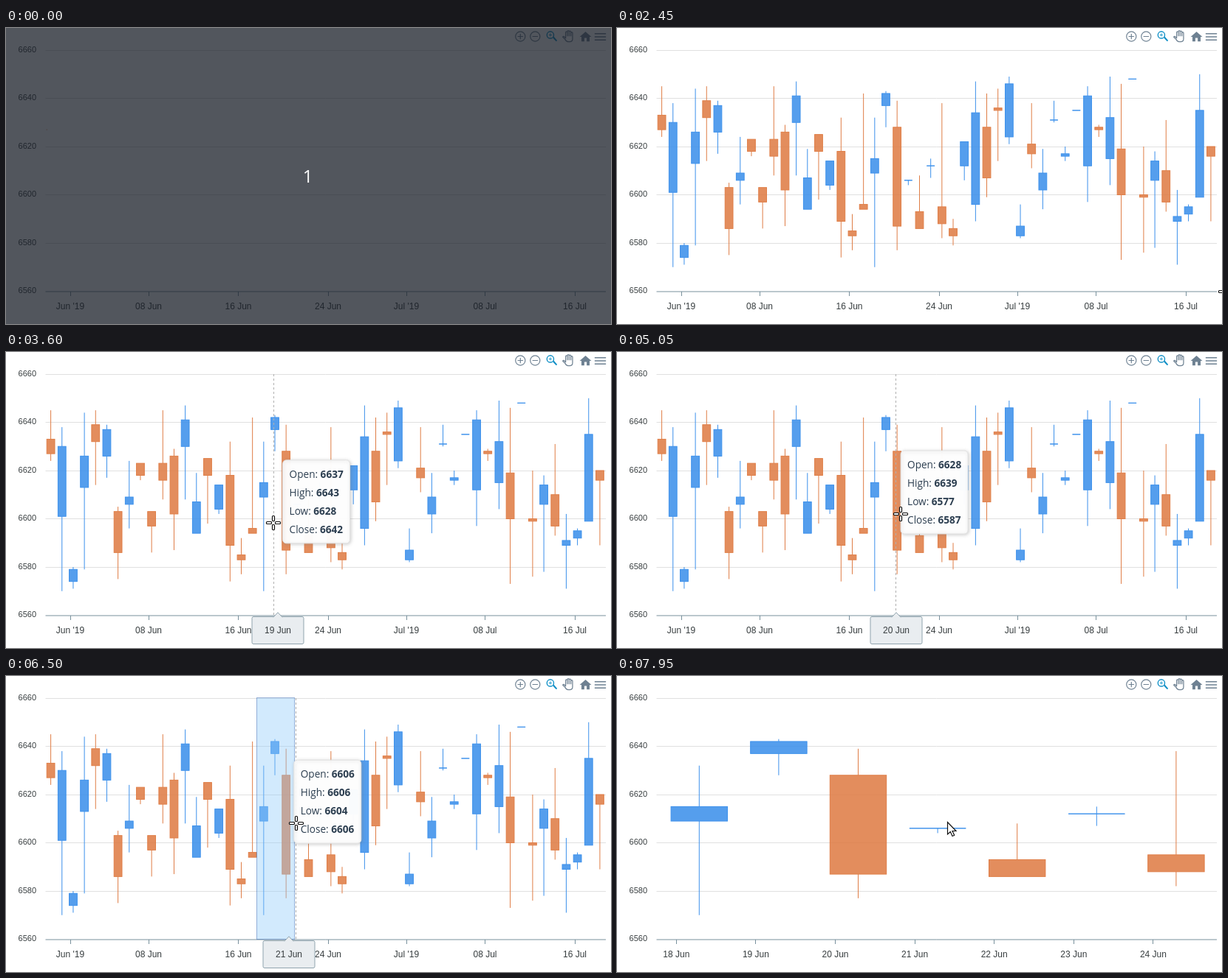
Animation, 819 px wide and 402 px high, one loop 8000 ms. Source, as an HTML page with a canvas:

```html
<!DOCTYPE html>
<html lang="en">
<head>
<meta charset="utf-8">
<title>Candlestick chart</title>
<style>
  html, body { margin: 0; width: 100%; height: 100%; overflow: hidden; background: #fff; }
  canvas { display: block; }
</style>
</head>
<body>
<canvas id="stage" width="819" height="402"></canvas>
<script>
const ctx = document.getElementById('stage').getContext('2d');
const LOOP = 8000, LEFT = 54, RIGHT = 812, TOP = 30, BOTTOM = 357.5;
const SHOW_TIP = 2470, DRAG = 6030, ZOOM = 7350, ARROW = 7940;
const UP = '60,144,235', DOWN = '223,125,70', SLATE = '#6e8192', INK = '#373d3f';
const LABEL_FONT = '12px "Liberation Sans", Arial, sans-serif';

// Prices are stored relative to 6500: [open, close] and [high, low].
const bodies = [
  [133,127],[101,130],[74,79],[113,126],[139,132],[126,137],[103,86],[106,109],[123,118],[103,97],
  [123,116],[126,102],[130,141],[94,107],[125,118],[104,114],[118,89],[85,83],[96,94],[109,115],
  [137,142],[128,87],[106,106],[93,86],[112,112],[95,88],[86,83],[112,122],[96,134],[128,107],
  [136,135],[124,146],[83,87],[121,117],[102,109],[131,131],[116,117],[135,135],[112,141],[128,127],
  [115,132],[119,100],[148,148],[100,99],[106,114],[110,97],[89,91],[92,95],[99,135],[120,116]];
const wicks = [
  [145,124],[138,70],[80,71],[144,79],[145,114],[139,117],[105,75],[124,96],[123,116],[103,86],
  [145,108],[129,87],[147,108],[119,94],[125,98],[114,102],[132,74],[92,77],[142,94],[132,70],
  [143,128],[139,77],[106,104],[108,86],[115,107],[138,82],[90,79],[122,106],[147,89],[142,99],
  [144,114],[149,121],[96,82],[138,111],[119,94],[139,130],[120,114],[135,135],[145,97],[129,124],
  [149,104],[146,73],[148,148],[120,76],[118,78],[131,93],[102,71],[96,89],[150,99],[120,89]];

// Pointer path: time, x, y
const path = [
  [2450,825,358],[2650,690,318],[2850,545,272],[3000,452,243],[3120,415,239],[3250,397,236],
  [3600,362,232],[3930,351,230],[4080,351,229],[4450,351,229],[4680,384,220],[5050,384,220],
  [5500,352,207],[5850,341,201],[6030,341,201],[6500,393,200],[6830,431,200],[7000,449,201]];

const wide = { x0: 60.6, step: 15.17, ticks: [
  [87,"Jun '19"],[193,'08 Jun'],[314.5,'16 Jun'],[436,'24 Jun'],[542,"Jul '19"],[648.5,'08 Jul'],[770,'16 Jul']] };
const close = { x0: 111.3 - 19 * 107.6, step: 107.6,
  ticks: Array.from({ length: 7 }, (_, k) => [80.3 + 107.6 * k, `${18 + k} Jun`]) };

const clamp = (v, lo, hi) => Math.min(hi, Math.max(lo, v));
const yOf = price => TOP + (160 - price) * 3.275;

function pointer(t) {
  const i = path.findIndex(p => p[0] > t);
  if (i < 1) return i ? path[path.length - 1].slice(1) : path[0].slice(1);
  const [a, b] = [path[i - 1], path[i]], f = (t - a[0]) / (b[0] - a[0]);
  return [1, 2].map(k => a[k] + (b[k] - a[k]) * f);
}

const nearest = x => clamp(Math.round((x - wide.x0) / wide.step), 0, 49);
const crossX = i => 59 + i * wide.step;

function tipTarget(t) {
  if (t < SHOW_TIP) return [52, 20, 88];
  const [x, y] = pointer(t), cx = crossX(nearest(x));
  return [cx > 432 ? cx - 94 : cx + 6.5, Math.min(y - 86, 244), cx];
}

// Tooltip and axis label trail their targets by a 150 ms transition.
function trailing(t) {
  const sum = [0, 0, 0], n = 16;
  for (let k = 0; k < n; k++) tipTarget(t - k * 10).forEach((v, j) => sum[j] += v / n);
  return sum;
}

function text(str, x, y, font, color = INK, align = 'center') {
  ctx.font = font; ctx.fillStyle = color; ctx.textAlign = align;
  ctx.fillText(str, x, y);
}

function line(x1, y1, x2, y2, color, dash = []) {
  ctx.strokeStyle = color; ctx.lineWidth = 1; ctx.setLineDash(dash);
  ctx.beginPath(); ctx.moveTo(x1, y1); ctx.lineTo(x2, y2); ctx.stroke();
  ctx.setLineDash([]);
}

function box(x, y, w, h, r, fill, stroke) {
  ctx.beginPath(); ctx.roundRect(x, y, w, h, r);
  ctx.fillStyle = fill; ctx.fill();
  ctx.strokeStyle = stroke; ctx.lineWidth = 1; ctx.stroke();
}

function drawAxes(ticks) {
  for (let p = 60; p <= 160; p += 20) {
    const y = Math.floor(yOf(p)) + .5;
    if (p > 60) line(LEFT - .5, y, RIGHT, y, '#e0e0e0');
    text(6500 + p, 41, y + 2, '11px "Liberation Sans", Arial, sans-serif', INK, 'right');
  }
  line(LEFT - .5, 358, RIGHT, 358, '#78909c');
  for (const [x, label] of ticks) {
    const tx = Math.floor(x) + .5;
    line(tx, 358, tx, 364, '#78909c');
    text(label, x, 382, LABEL_FONT);
  }
}

function drawCandle(i, view, t) {
  const u = clamp((t - i * 16) / 800, 0, 1), grow = 1 - (1 - u * u) ** 3;
  if (!grow) return;
  const [open, shut] = bodies[i], [high, low] = wicks[i];
  const w = view.step * .71, x = view.x0 + i * view.step - w / 2;
  const base = yOf(Math.min(open, shut)), at = p => base + (yOf(p) - base) * grow;
  const top = at(Math.max(open, shut)), mid = x + w * grow / 2;
  const rgb = shut >= open ? UP : DOWN, stroke = `rgb(${rgb})`;
  line(mid, at(high), mid, top, stroke);
  line(mid, base, mid, at(low), stroke);
  ctx.fillStyle = `rgba(${rgb},.87)`;
  ctx.fillRect(x, top, w * grow, base - top);
  ctx.strokeStyle = stroke;
  ctx.strokeRect(x, top, w * grow, base - top);
}

function icon(d, x, y, scale, color, stroke) {
  ctx.save();
  ctx.translate(x, y); ctx.scale(scale, scale); ctx.translate(-12, -12);
  ctx.lineWidth = 1.6; ctx.lineJoin = ctx.lineCap = 'round';
  ctx.fillStyle = ctx.strokeStyle = color;
  stroke ? ctx.stroke(new Path2D(d)) : ctx.fill(new Path2D(d));
  ctx.restore();
}

function drawToolbar() {
  const ring = 'M21 12a9 9 0 1 1-18 0a9 9 0 1 1 18 0M7.5 12h9';
  icon(ring + 'M12 7.5v9', 696.3, 11.5, .73, SLATE, true);
  icon(ring, 716.3, 11.5, .73, SLATE, true);
  icon('M15 9.5a5.5 5.5 0 1 1-11 0a5.5 5.5 0 1 1 11 0', 739, 11.5, .84, '#0d8fc6', true);
  icon('M14 13l1-1 5.5 6.5-1.5 1.5-5-5zM12 10h-2v2H9v-2H7V9h2V7h1v2h2v1z', 739, 11.5, .84, '#0d8fc6');
  icon('M7 15V5a1.5 1.5 0 0 1 3 0v6V3.5a1.5 1.5 0 0 1 3 0V11V4a1.5 1.5 0 0 1 3 0v7V6a1.5 1.5 0 0 1 3 0v10c0 3-2 5-4 5h-4c-3 0-4-2-5-4l-4-4c1-2 3-1 5 2',
    761.5, 11.5, .78, SLATE, true);
  icon('M10 20v-6h4v6h5v-8h3L12 3 2 12h3v8z', 784.5, 12, .79, SLATE);
  icon('M3 18h18v-2H3zM3 13h18v-2H3zM3 8h18V6H3z', 804.5, 12, .85, SLATE);
}

function drawHover(t) {
  const i = nearest(pointer(t)[0]), cx = Math.floor(crossX(i)) + .5;
  const [x, y, labelX] = trailing(t), lx = Math.round(labelX);
  ctx.globalAlpha = clamp((t - SHOW_TIP) / 150, 0, 1);
  line(cx, TOP, cx, BOTTOM, '#b0b0b0', [3, 3]);

  box(lx - 35, 359.5, 70, 37, 2, '#e9edf0', '#90a4ae');
  ctx.beginPath();
  ctx.moveTo(lx - 6, 360.2); ctx.lineTo(lx, 353.7); ctx.lineTo(lx + 6, 360.2);
  ctx.fillStyle = '#e9edf0'; ctx.fill(); ctx.stroke();
  const day = i < 1 ? '30 May' : i < 2 ? '31 May' : null;
  const date = i < 32 ? `${String(i - 1).padStart(2, 0)} Jun` : `${String(i - 31).padStart(2, 0)} Jul`;
  text(day || date, lx, 382, LABEL_FONT);

  ctx.save();
  ctx.shadowColor = 'rgba(120,120,120,.35)'; ctx.shadowBlur = 4;
  ctx.shadowOffsetX = ctx.shadowOffsetY = 1;
  box(x, y, 91, 113, 5, 'rgba(255,255,255,.96)', '#e3e3e3');
  ctx.restore();
  const font = '13.6px "Open Sans", "Noto Sans", sans-serif', dark = '#2c3e50';
  const rows = { Open: bodies[i][0], High: wicks[i][0], Low: wicks[i][1], Close: bodies[i][1] };
  Object.entries(rows).forEach(([name, value], k) => {
    const ty = y + 24 + 25 * k;
    text(name + ': ', x + 9, ty, font, dark, 'left');
    const indent = ctx.measureText(name + ': ').width;
    text(6500 + value, x + 9 + indent, ty, 'bold ' + font, dark, 'left');
  });
  ctx.globalAlpha = 1;
}

function drawSelection(x) {
  const w = x - 342;
  if (w <= 0) return;
  ctx.fillStyle = 'rgba(144,202,249,.4)'; ctx.fillRect(339.5, TOP, w, 327.5);
  ctx.strokeStyle = 'rgba(13,71,161,.4)'; ctx.strokeRect(339.5, TOP - .5, w, 328);
}

function drawPointer(t) {
  const [x, y] = pointer(t).map(Math.round);
  ctx.save();
  ctx.translate(x, y);
  ctx.strokeStyle = '#111'; ctx.fillStyle = '#fff'; ctx.lineWidth = 1.2;
  if (t >= ARROW) {
    const arrow = new Path2D('M-1.5-2.5v16.5l3.8-3.5 2.7 6 2.7-1.2-2.7-5.8h5z');
    ctx.fill(arrow); ctx.stroke(arrow);
  } else {
    for (let k = 0; k < 4; k++) {
      ctx.beginPath(); ctx.roundRect(2.5, -1.5, 7, 3, 1);
      ctx.fill(); ctx.stroke();
      ctx.rotate(Math.PI / 2);
    }
  }
  ctx.restore();
}

function draw(t) {
  const zoomed = t >= ZOOM, view = zoomed ? close : wide;
  ctx.fillStyle = '#fff'; ctx.fillRect(0, 0, 819, 402);
  drawAxes(view.ticks);
  ctx.save();
  ctx.beginPath(); ctx.rect(LEFT - 1, 0, RIGHT - LEFT + 1, 402); ctx.clip();
  bodies.forEach((_, i) => drawCandle(i, view, t));
  ctx.restore();
  drawToolbar();
  if (t >= DRAG && !zoomed) drawSelection(pointer(t)[0]);
  if (t >= SHOW_TIP && !zoomed) drawHover(t);
  if (t >= 2450) drawPointer(t);
  if (t < 30) {
    ctx.fillStyle = 'rgba(25,30,39,.75)'; ctx.fillRect(0, 0, 819, 402);
    text('1', 408.5, 210, '24px "Open Sans", "Noto Sans", sans-serif', '#fff');
  }
}

const start = performance.now();
function tick() {
  draw((performance.now() - start) % LOOP);
  requestAnimationFrame(tick);
}
tick();
</script>
</body>
</html>
```
